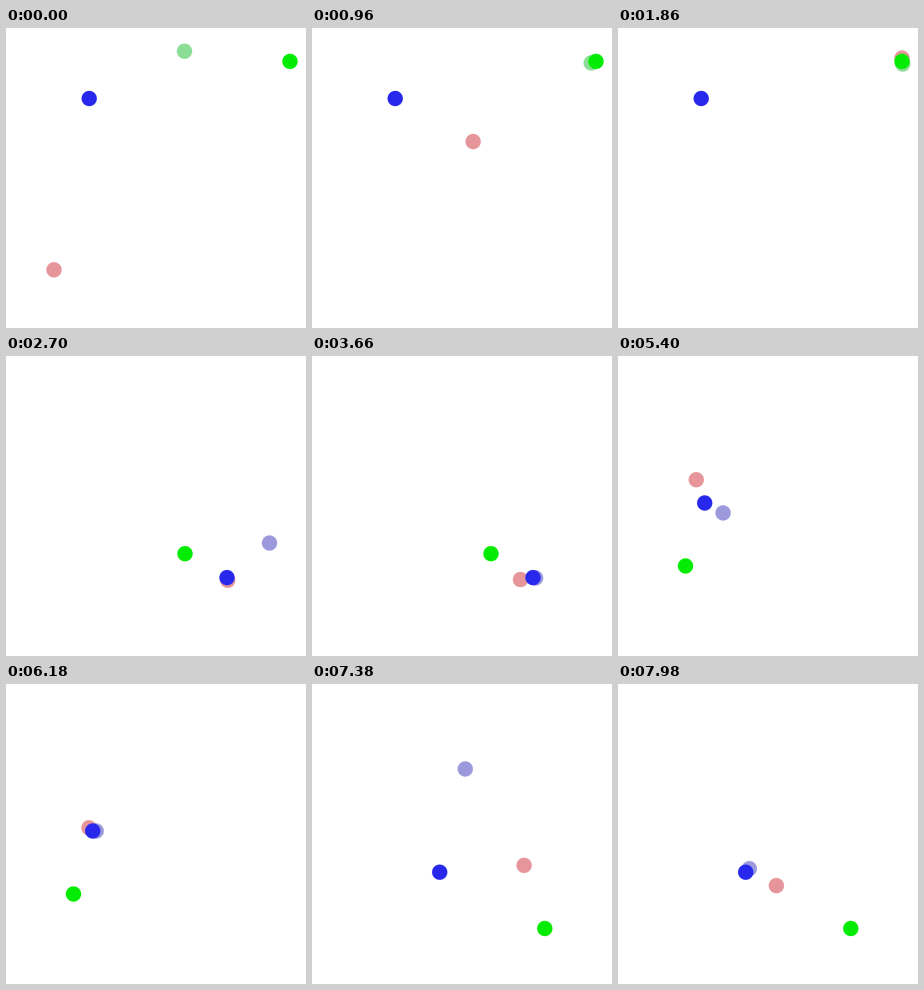
An HTML page with a canvas for the animation above (8000 ms loop, 300 by 300 pixels).

```html
<!DOCTYPE html>
<html lang="en">
<head>
<meta charset="utf-8">
<title>Pursuit of the goal</title>
<style>
  html, body { margin: 0; width: 100%; height: 100%; overflow: hidden; background: #fff; }
  canvas { display: block; width: 100vw; height: 100vh; }
</style>
</head>
<body>
<canvas id="stage"></canvas>
<script>
const LOOP = 8000, FRAME = 60, STEP = 90, PHASE = 50, SIZE = 300;
const RADIUS = 7.7, SOFT_EDGE = 0.6;
const LANDMARK = { green: '4,236,4', blue: '40,40,236' };
const MOVER = { red: '205,45,53', green: '25,189,45', blue: '57,53,185' };

const leg = (steps, x, y, bend = 0) => ({ steps, x, y, bend });
const mover = (x, y, ...legs) => ({ x, y, legs });

// Each round: two fixed landmarks, an adversary, and an agent heading for its goal.
const rounds = [
  { start: 0, goal: 'green', green: [284, 33.4], blue: [83.2, 70.5],
    adversary: mover(48, 241.8, leg(21, 284, 30, 20)),
    agent: mover(178.5, 23.2, leg(12, 281.2, 35.2), leg(8, 282, 35), leg(5, 308, 45)) },
  { start: 26, goal: 'blue', green: [179, 197.7], blue: [221, 221.6],
    adversary: mover(221.2, 215.5, leg(7, 222, 230), leg(12, 209, 216.3, 7)),
    agent: mover(292, 162, leg(9, 223.6, 222)) },
  { start: 53, goal: 'blue', green: [67.5, 210], blue: [86.7, 147],
    adversary: mover(61, 51, leg(10, 83, 143.8)),
    agent: mover(159, 193, leg(10, 90.2, 147)) },
  { start: 78, goal: 'blue', green: [232.8, 244.5], blue: [127.7, 188.2],
    adversary: mover(226, 168, leg(13, 152.8, 201.8, 9)),
    agent: mover(160.2, 53.3, leg(13, 129.4, 193.6)) }
];

const canvas = document.getElementById('stage');
const ctx = canvas.getContext('2d');

const ease = u => u * u * (3 - 2 * u);

// Follows the legs in turn; a bend bows the straight line sideways.
function positionOf({ x, y, legs }, step) {
  for (const to of legs) {
    const e = ease(Math.min(1, step / to.steps));
    const dx = to.x - x, dy = to.y - y;
    const bow = to.bend * 4 * e * (1 - e) / Math.hypot(dx, dy);
    x += dx * e + dy * bow;
    y += dy * e - dx * bow;
    if (step <= to.steps) break;
    step -= to.steps;
  }
  return [x, y];
}

function disc([x, y], rgb, alpha = 1) {
  const outer = RADIUS + SOFT_EDGE;
  const fill = ctx.createRadialGradient(x, y, RADIUS - SOFT_EDGE, x, y, outer);
  fill.addColorStop(0, `rgba(${rgb},${alpha})`);
  fill.addColorStop(1, `rgba(${rgb},0)`);
  ctx.fillStyle = fill;
  ctx.beginPath();
  ctx.arc(x, y, outer, 0, 2 * Math.PI);
  ctx.fill();
}

function resize() {
  const ratio = devicePixelRatio || 1;
  const width = Math.round(innerWidth * ratio), height = Math.round(innerHeight * ratio);
  if (canvas.width !== width || canvas.height !== height) {
    canvas.width = width;
    canvas.height = height;
  }
}

function draw(now) {
  resize();
  const time = Math.floor((now % LOOP) / FRAME) * FRAME;
  const step = Math.floor((time + PHASE) / STEP);
  const round = rounds.findLast(r => r.start <= step);
  const elapsed = step - round.start;
  ctx.setTransform(canvas.width / SIZE, 0, 0, canvas.height / SIZE, 0, 0);
  ctx.fillStyle = '#fff';
  ctx.fillRect(0, 0, SIZE, SIZE);
  disc(positionOf(round.adversary, elapsed), MOVER.red, 0.5);
  disc(positionOf(round.agent, elapsed), MOVER[round.goal], 0.5);
  disc(round.green, LANDMARK.green);
  disc(round.blue, LANDMARK.blue);
}

let origin;
function tick(now) {
  origin ??= now;
  draw(now - origin);
  requestAnimationFrame(tick);
}
draw(0);
requestAnimationFrame(tick);
</script>
</body>
</html>
```
